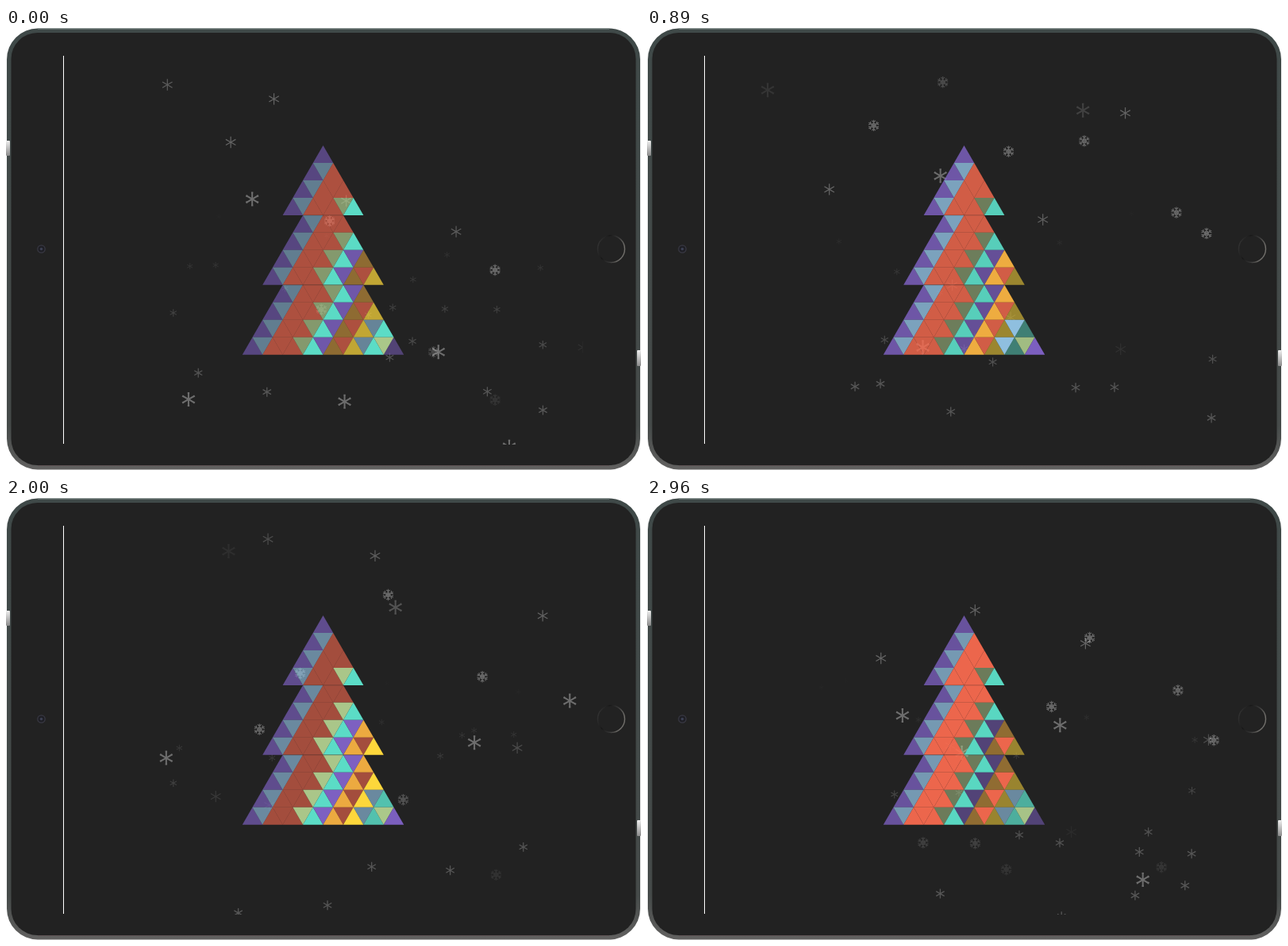
Animation of 800x557 px, one loop 3 s. Source, as an HTML page:

```html
<!DOCTYPE html>
<html lang="en">
<head>
<meta charset="utf-8">
<title>Winter tree</title>
<style>
  html, body { margin: 0; width: 100%; height: 100%; overflow: hidden; background: #fff; }
  svg { display: block; width: 100%; height: 100%; }
</style>
</head>
<body>
<svg viewBox="0 0 800 557">
  <defs>
    <linearGradient id="rim" x1="0" y1="0" x2="0" y2="1">
      <stop offset="0" stop-color="#3f4948"/>
      <stop offset=".9" stop-color="#454a49"/>
      <stop offset="1" stop-color="#626160"/>
    </linearGradient>
    <linearGradient id="key" x1="0" y1="0" x2="0" y2="1">
      <stop offset="0" stop-color="#eee"/>
      <stop offset="1" stop-color="#8c8c8c"/>
    </linearGradient>
    <linearGradient id="home" x1="0" y1="0" x2="1" y2=".35">
      <stop offset="0" stop-color="#3c3c3c"/>
      <stop offset=".4" stop-color="#181818"/>
      <stop offset=".7" stop-color="#383838"/>
      <stop offset="1" stop-color="#72706c"/>
    </linearGradient>
    <clipPath id="screen"><rect x="73" y="35" width="653.5" height="490"/></clipPath>
  </defs>
  <rect x="1" y=".5" width="798" height="556" rx="39" fill="url(#rim)"/>
  <path d="M40 1H760" stroke="#7f8a89"/>
  <path d="M40 551.5H760" stroke="#5e5354"/>
  <rect x="6.5" y="6" width="787" height="545" rx="33" fill="#222"/>
  <rect x="0" y="142" width="5" height="19" rx="1" fill="url(#key)"/>
  <rect x="795" y="406" width="5" height="20" rx="1" fill="url(#key)"/>
  <circle cx="44.5" cy="278.5" r="4.7" fill="#1f1f25" stroke="#3a3a45" stroke-width="1.2"/>
  <circle cx="44.5" cy="278.5" r="1.8" fill="#3c4052"/>
  <circle cx="762.5" cy="278.5" r="17" fill="none" stroke="url(#home)" stroke-width="1.4"/>
  <path d="M72.5 35V524" stroke="#fff"/>
  <g id="snow" clip-path="url(#screen)"></g>
  <g id="tree"></g>
  <path d="M374 235.900H425M348.500 323.800H450" stroke="#222" stroke-opacity=".4" stroke-width=".8"/>
</svg>
<script>
const LOOP = 3000, TAU = 2 * Math.PI;
const NS = 'http://www.w3.org/2000/svg';
const snow = document.getElementById('snow');
const tree = document.getElementById('tree');

function add(parent, tag, attrs) {
  const node = document.createElementNS(NS, tag);
  for (const key in attrs) node.setAttribute(key, attrs[key]);
  return parent.appendChild(node);
}

const ramp = (v, a, b) => Math.max(0, Math.min(1, (v - a) / (b - a)));
const mod = (a, n) => (a % n + n) % n;

let seed = 7;
function random() {
  seed = seed * 16807 % 2147483647;
  return seed / 2147483647;
}

// A pulse swings opacity between .5 and 1, given its period and peak in ms.
const pulse = (period, peak) => now => .75 + .25 * Math.cos(TAU * (now - peak) / period);
const edge = pulse(1030, 640), heart = pulse(1930, 1295), slow = pulse(2600, 1900),
      fast = pulse(1020, -30), warm = pulse(1440, 720);
const purple = '#8163c8', blue = '#92c3e4', red = '#ff6c50', green = '#abc88a',
      teal = '#5bdcc6', orange = '#f9b342', yellow = '#ffd93b';

// Diagonal bands of the tree, left to right.
const bands = [
  [purple, edge], [blue, edge], [red, heart], [red, heart], [red, heart],
  [green, slow], [teal, fast], [purple, pulse(1790, 370)], [orange, warm],
  [red, heart], [yellow, slow], [blue, pulse(1500, 2480)],
  [teal, pulse(1680, 20)], [green, fast], [purple, warm]
];

const HALF = 12.72, ROW = 21.97, CX = 399.5, TOP = 148;
const triangles = [];
for (let row = 0; row < 12; row++) {
  const ups = row % 4 + 1 + 2 * Math.floor(row / 4);
  const y = TOP + row * ROW;
  for (let i = 0; i < 2 * ups - 1; i++) {
    const x = CX + (i - ups + 1) * HALF;
    const [base, tip] = i % 2 ? [y, y + ROW] : [y + ROW, y];
    const [fill, glow] = bands[i];
    const points = `${x - HALF},${base} ${x + HALF},${base} ${x},${tip}`;
    triangles.push({ node: add(tree, 'polygon', { points, fill }), glow });
  }
}

// Flakes hang on evenly spaced columns and fall again and again along a slant.
const FALL = 580, DRIFT = .2, COLUMN = 653.5 / 40;
const pairs = (first, pitch) => j => first + pitch * COLUMN * (j >> 1) + 4 * COLUMN * (j % 2);

// falls: duration and moment of start, in seconds; fade: heights of showing and vanishing.
const kinds = [
  { arm: 'M0 0V-8.800M-1.200 -8H1.200', width: 2, alpha: .34, fade: [45, 190, 560, 700],
    column: pairs(135, 12),
    column0: 1,
    falls: [[2.64, .51], [2.69, 1.69], [1.7, .32], [3.75, 1.11], [3.22, .29], [2.59, .86]] },
  { arm: 'M0 0V-7.200M-2.300 -6.200L0 -4L2.300 -6.200M-1.600 -2.700L0 -1.500L1.600 -2.700',
    width: 1.1, alpha: .32, fade: [10, 110, 320, 520],
    column: pairs(261, 6),
    column0: 0,
    falls: [[3.9, .04], [2.6, 1.01], [1.24, .72], [2.93, .08], [3.95, 1.17],
            [1.98, .38], [2.32, 1.1], [2.06, .04], [1.94, 0]] },
  { arm: 'M0 0V-7.200', width: 1.2, alpha: .3, fade: [0, 80, 230, 450],
    column: pairs(189, 8),
    column0: 0,
    falls: [[3.81, -.47], [1.41, -.35], [2.14, -.33], [3.41, 2.13],
            [1.6, .2], [3.39, 1.89], [3.17, .28], [3.56, 1.09]] },
  { arm: 'M0 0V-6', width: 1.3, alpha: .24, fade: [225, 450, 540, 700], grows: true,
    column: j => 139 + COLUMN * j,
    column0: 0,
    falls: Array.from({ length: 31 }, () => [2 + 1.8 * random(), 3 * random()]) }
];
kinds[0].column = j => pairs(71, 12)(j);

const flakes = kinds.flatMap(kind => kind.falls.map(([period, start], j) => {
  const node = add(snow, 'g', { stroke: '#fff', 'stroke-width': kind.width, fill: 'none' });
  for (let i = 0; i < 6; i++) add(node, 'path', { d: kind.arm, transform: `rotate(${60 * i})` });
  return { node, kind, period, start, x: kind.column(j + kind.column0) };
}));

// The first picture rests for 60 ms; the lag is made up by 1370 ms.
const clock = t => t < 60 ? 0 : t - 25 * (1 - ramp(t, 890, 1370));

function draw(t) {
  const now = clock(t);
  for (const { node, glow } of triangles) node.setAttribute('fill-opacity', glow(now).toFixed(3));
  for (const { node, kind, period, start, x } of flakes) {
    const y = FALL * mod(now / 1000 - start, period) / period;
    const [a, b, c, d] = kind.fade;
    const shown = ramp(y, a, b) * (1 - ramp(y, c, d));
    const scale = kind.grows ? .5 + .5 * shown : 1;
    node.setAttribute('opacity', (kind.alpha * shown).toFixed(3));
    node.setAttribute('transform',
      `translate(${(x + DRIFT * y).toFixed(2)} ${y.toFixed(2)}) scale(${scale.toFixed(3)})`);
  }
}

const begin = performance.now();
function tick() {
  draw((performance.now() - begin) % LOOP);
  requestAnimationFrame(tick);
}
tick();
</script>
</body>
</html>
```
